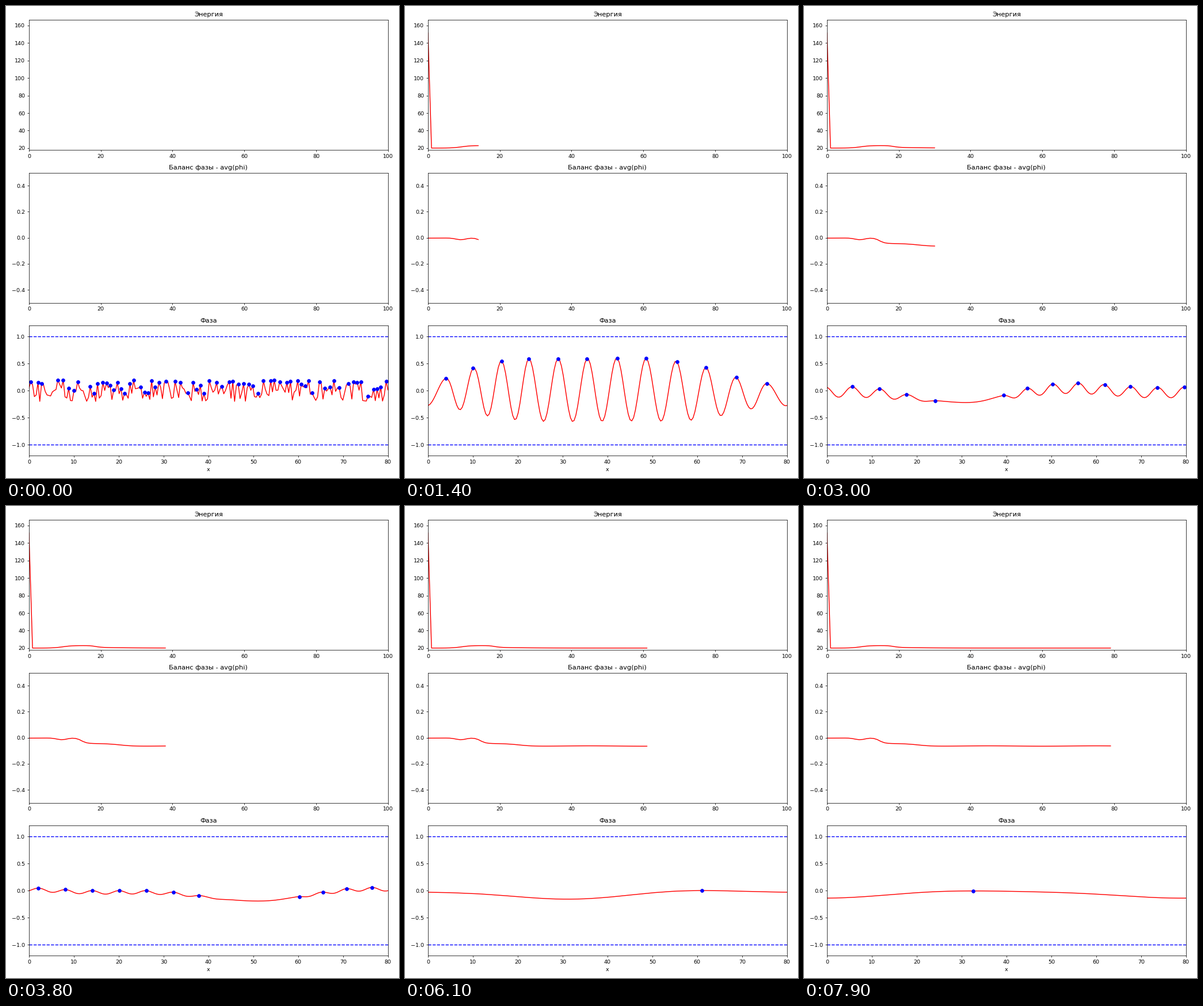
Animation, 683 px wide and 820 px high, one loop 8000 ms. Source, as a matplotlib script:

```python
import numpy as np
import matplotlib.pyplot as plt
from matplotlib.animation import FuncAnimation

FRAMES, STEP = 80, 100
SPAN = 80
K = 2 * np.pi / SPAN
x = np.linspace(0, SPAN, 200)
steps = np.arange(FRAMES)

# The ripple has 12 crests around the period. At three key times the chosen
# crests sit at these places; the phase is linear between them.
KEY_TIMES = [14, 22, 30]
CREST_NO = [0, 4, 6, 7, 8, 9, 12]
CRESTS = np.array([[22.5, 48.6, 62, 68.7, 75.5, 84, 102.5],
                   [42.6, 68.4, 80.4, 89.3, 97.3, 104.1, 122.6],
                   [61.8, 85.6, 98.1, 105.3, 119, 124.6, 141.8]])
# Weak spot of the envelope: crest number, depth, width.
WEAK = np.array([[8.2, .64, 2], [7.4, .9, 1.3], [7.2, .9, 1.5]])
DRIFT = 2.55


def sigmoid(u):
    return 1 / (1 + np.exp(-u))


def at_time(table, t):
    return np.array([np.interp(t, KEY_TIMES, col) for col in table.T])


def energy_curve(t):
    rise = sigmoid((t - 9.4) / 1.3)
    tail = np.exp(-np.maximum(t - 17, 0) / 8)
    fall = .62 * sigmoid((18.6 - t) / .8) + .38 * tail
    return np.where(t == 0, 151.4, 20.1 + 2.85 * rise * fall)


def balance_curve(t):
    dip = .014 * np.exp(-((t - 9.2) / 2) ** 2)
    drop = .044 * sigmoid((t - 14.6) / .75) + .018 * sigmoid((t - 25.5) / 1.8)
    return -.0015 - dip - drop + .0015 * np.cos(2 * np.pi * (t - 45) / 30)


energy = energy_curve(steps)
balance = balance_curve(steps)


def swell(t):
    """Two slow harmonics that fade in, drift and decay."""
    d = t - 46
    s = np.clip((t - 10) / 14, 0, 1)
    first = .0803 * np.exp(-.0065 * d) * np.cos(K * (x - 28.3 - 2.7 * d))
    second = .033 * np.exp(-.0305 * d) * np.cos(2 * K * (x - 13.2 - 2.67 * d))
    return s * s * (3 - 2 * s) * (first + second)


def ripple(t):
    """Short wave: grows, then dies out while it drifts to the right."""
    held = np.clip(t, KEY_TIMES[0], KEY_TIMES[-1])
    crests = at_time(CRESTS, held) + DRIFT * (t - held)
    place, depth, width = at_time(WEAK, held)
    pos = (x - crests[0]) % SPAN + crests[0]
    n = np.interp(pos, crests, CREST_NO)
    gap = (n - place + 6) % 12 - 6
    d = max(t - 14, 0)
    size = .59 * sigmoid(.7 * (t - 7.9)) * np.exp(-.095 * d - .0011 * d * d)
    env = size * (1 - depth * np.exp(-(gap / width) ** 2))
    return env * np.cos(2 * np.pi * n) + .2 * (env - env.mean())


def phase(t):
    if t == 0:
        return np.random.default_rng(7).uniform(-.2, .2, len(x))
    return balance[t] + swell(t) + ripple(t)


def crest_points(y):
    return np.flatnonzero((y[1:-1] > y[:-2]) & (y[1:-1] > y[2:])) + 1


fig, axes = plt.subplots(3, 1, figsize=(10, 12.006), dpi=68.3)
panels = [("Энергия", 100, (18, 166.4)),
          ("Баланс фазы - avg(phi)", 100, (-.5, .5)),
          ("Фаза", SPAN, (-1.2, 1.2))]
for ax, (title, xmax, ylim) in zip(axes, panels):
    ax.set_title(title)
    ax.set_xlim(0, xmax)
    ax.set_ylim(*ylim)
ax_e, ax_b, ax_p = axes
ax_p.set_xlabel("x")
for level in (-1, 1):
    ax_p.plot([0, SPAN], [level, level], "b--")
fig.tight_layout()

line_e, = ax_e.plot([], [], "r")
line_b, = ax_b.plot([], [], "r")
line_p, = ax_p.plot([], [], "r")
dots, = ax_p.plot([], [], "bo")


def update(t):
    line_e.set_data(steps[:t + 1], energy[:t + 1])
    line_b.set_data(steps[:t + 1], balance[:t + 1])
    y = phase(t)
    top = crest_points(y)
    line_p.set_data(x, y)
    dots.set_data(x[top], y[top])
    return line_e, line_b, line_p, dots


anim = FuncAnimation(fig, update, frames=FRAMES, interval=STEP, repeat=True,
                     repeat_delay=0)
plt.show()
```
